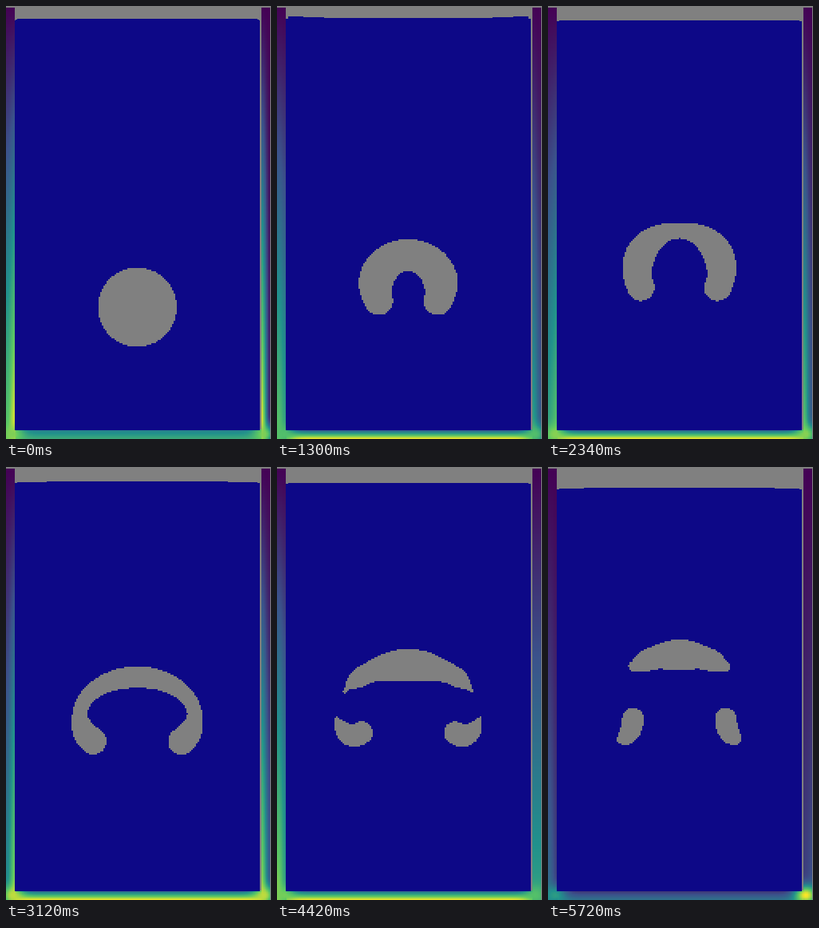
Recreate the animation shown at these times as an HTML page with a canvas. Size 332x542 px, loop 5980 ms.

```html
<!DOCTYPE html>
<html lang="en">
<head>
<meta charset="utf-8">
<title>Rising bubble</title>
<style>
  html, body { margin: 0; width: 100%; height: 100%; overflow: hidden; }
  canvas { display: block; }
</style>
</head>
<body>
<canvas id="stage" width="332" height="542"></canvas>
<script>
const ctx = document.getElementById('stage').getContext('2d');
const W = 332, H = 542, LOOP = 5980, STEP = 260, SPLIT = 4160, CELL = 2;
const LEFT = 11, RIGHT = 318, FLOOR = 531, CENTER = 164.5;
const GAS = '#808080', LIQUID = '#0d0887';
const VIRIDIS = [[68, 1, 84], [59, 82, 139], [33, 145, 140], [94, 201, 98], [253, 231, 37]];

// Elliptic arch: width, height, centre y, sweep in degrees; thickness at top, neck, end.
const arch = [
  [0, [0, 0, 377, 115, 49.5, 49.5, 49.5]],
  [1300, [41, 40, 352, 115, 20, 22, 18]],
  [2340, [53, 50, 331, 115, 10, 19, 17]],
  [3120, [72, 49, 312, 130, 13.5, 9, 16.5]],
  [3900, [86, 51, 305, 131, 19, 2.5, 15.5]]
];
const cap = [
  [SPLIT, [88, 52, 303, 73, 20, 11, 1]],
  [4940, [82, 55, 297, 57, 21, 15, 5]],
  [5720, [80, 51, 286, 45, 19, 14, 7]]
];
// Curved drop: head, bend and tail points; head and tail radius.
const lobe = [
  [SPLIT, [59, 338, 88, 342, 89, 304, 15, 1]],
  [4940, [58, 322, 56, 352, 93, 331, 12.5, 0.5]],
  [5720, [58, 315, 60, 337, 73, 341, 13.5, 5]]
];
// Liquid level and how far it dips beside the walls.
const surface = [
  [0, [16, 0.5]], [1300, [15, -2]], [2340, [17.5, 0.5]],
  [4940, [20, 1]], [5200, [21, 1]], [5720, [26, 1]]
];
// Stress: outer left, inner, outer right; floor top and edge; left and right corner.
const stress = [
  [0, [.75, 1, .1, .45, .6, .8, .8]],
  [1300, [.75, .58, .3, .35, .95, .7, .7]],
  [3120, [.5, .86, .3, .4, .95, .9, .9]],
  [3900, [.82, .55, .65, .4, .95, .82, .82]],
  [4940, [.85, .6, .5, .4, .95, .75, .6]],
  [5720, [.35, .2, .25, .18, .36, .55, 1]]
];

const lerp = (a, b, k) => a + (b - a) * k;
const mix = (a, b, k) => a.map((v, i) => lerp(v, b[i], k));
const smooth = k => k * k * (3 - 2 * k);
const snap = v => CELL * Math.round(v / CELL);

function at(keys, t) {
  let i = 1;
  while (i < keys.length - 1 && t > keys[i][0]) i++;
  const [t0, a] = keys[i - 1], [t1, b] = keys[i];
  return mix(a, b, (t - t0) / (t1 - t0));
}

function color(v) {
  const p = Math.min(Math.max(v, 0), 1) * 4, i = Math.min(Math.floor(p), 3);
  return `rgb(${mix(VIRIDIS[i], VIRIDIS[i + 1], p - i).map(Math.round)})`;
}

function archPoint([w, h, y, sweep, top, neck, end], u) {
  const a = sweep * u * Math.PI / 180, n = 0.62;
  const r = u < n ? lerp(top, neck, smooth(u / n)) : lerp(neck, end, smooth((u - n) / (1 - n)));
  return [w * Math.sin(a), y - h * Math.cos(a), r];
}

function lobePoint([hx, hy, bx, by, tx, ty, head, tail], u) {
  const bend = (a, b, c) => lerp(lerp(a, b, u), lerp(b, c, u), u);
  return [bend(hx, bx, tx), bend(hy, by, ty), lerp(head, tail, u ** 3)];
}

function disc(cx, cy, r) {
  for (let y = CELL * Math.ceil((cy - r - 1) / CELL); y + 1 <= cy + r; y += CELL) {
    const half = Math.sqrt(r * r - (y + 1 - cy) ** 2), x = snap(cx - half);
    ctx.fillRect(x, y, snap(cx + half) - x, CELL);
  }
}

function sweepDiscs(point, shape) {
  for (let i = 0; i <= 80; i++) {
    const [x, y, r] = point(shape, i / 80);
    disc(CENTER + x, y, r);
    disc(CENTER - x, y, r);
  }
}

function drawBubble(t) {
  ctx.fillStyle = GAS;
  sweepDiscs(archPoint, at(t < SPLIT ? arch : cap, t));
  if (t >= SPLIT) sweepDiscs(lobePoint, at(lobe, t));
}

function drawLiquid(t) {
  const [level, dip] = at(surface, t);
  ctx.fillStyle = GAS;
  ctx.fillRect(LEFT, 0, RIGHT - LEFT, 40);
  ctx.fillStyle = LIQUID;
  for (let x = LEFT; x < RIGHT; x++) {
    const d = Math.min(x - LEFT, RIGHT - 1 - x);
    const top = Math.round(level + dip * Math.exp(-((d / 40) ** 2)) + (d < 3 ? 1 - Math.min(dip, 0) : 0));
    ctx.fillRect(x, top, 1, FLOOR - top);
  }
}

function drawWalls(t) {
  const [outerL, inner, outerR, floorTop, floorEdge, cornerL, cornerR] = at(stress, t);
  for (let y = 2; y < H; y += CELL)
    for (let x = 0; x < W; x += CELL) {
      const onLeft = x < CENTER, d = onLeft ? x : W - CELL - x;
      if (d > LEFT && y < FLOOR - 1) continue;
      const wall = lerp(onLeft ? outerL : outerR, inner, smooth(Math.min(d / LEFT, 1))) * y / H;
      const floor = lerp(floorTop, floorEdge, (y - FLOOR) / (H - CELL - FLOOR));
      const glow = Math.exp(-(((d - 8) / 14) ** 2) - ((y - 535) / 12) ** 2);
      ctx.fillStyle = color(lerp(d < LEFT ? wall : floor, onLeft ? cornerL : cornerR, glow));
      ctx.fillRect(x, y, CELL, CELL);
    }
}

let shown = -1;
function tick() {
  const t = Math.floor(performance.now() % LOOP / STEP) * STEP;
  if (t !== shown) {
    shown = t;
    ctx.fillStyle = GAS;
    ctx.fillRect(0, 0, W, H);
    drawWalls(t);
    drawLiquid(t);
    drawBubble(t);
    ctx.fillRect(W - 1, 0, 1, H);
  }
  requestAnimationFrame(tick);
}
tick();
</script>
</body>
</html>
```
